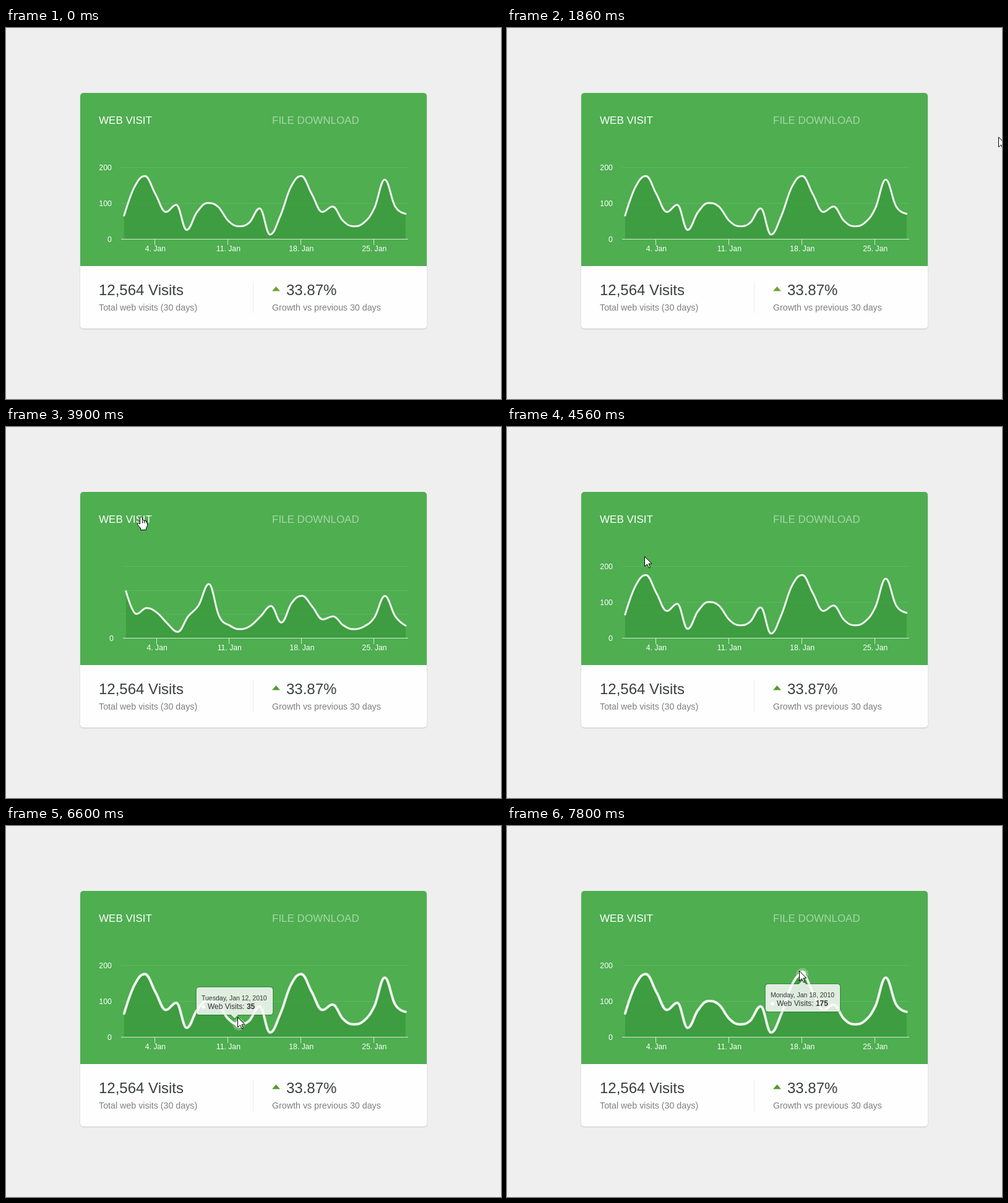
An HTML page with a canvas for the animation above (8000 ms loop, 800 by 600 pixels).

```html
<!DOCTYPE html>
<html lang="en">
<head>
<meta charset="utf-8">
<title>Web visit card</title>
<style>
  html, body { margin: 0; width: 100%; height: 100%; overflow: hidden; background: #efefef; }
  canvas { display: block; }
</style>
</head>
<body>
<canvas id="stage" width="800" height="600"></canvas>
<script>
const ctx = document.getElementById('stage').getContext('2d');
const FONT = '"Liberation Sans", Arial, sans-serif';
const LOOP = 8000, MORPH = 190, BASE = 341, TOP = 225, RIGHT = 650;
const TO_FILES = 3000, TO_VISITS = 3900, RELOAD = 720, HOVER = 4620;

const visits = [65, 145, 175, 125, 75, 95, 25, 75, 100, 90, 50, 35, 45, 85,
  12, 65, 145, 175, 125, 75, 90, 50, 35, 45, 85, 165, 90, 70];
const files = [19.5, 10, 12.5, 10.5, 6, 2.5, 9, 13.5, 22.5, 9, 5.2, 3.6, 5, 9,
  13.3, 6.4, 14.6, 17.6, 13, 7.7, 9, 5.2, 3.6, 4.8, 8.6, 17.5, 9, 5.1];
const weekdays = ['Sunday', 'Monday', 'Tuesday', 'Wednesday', 'Thursday', 'Friday', 'Saturday'];

// Pointer track: time, x, y
const track = [
  [0, 830, 190], [1830, 805, 182], [1860, 794, 176], [2040, 718, 125], [2220, 645, 99],
  [2340, 593, 107], [2490, 541, 128], [2640, 531, 144], [2670, 532, 146], [3390, 532, 146],
  [3540, 370, 147], [3690, 218, 146], [4380, 218, 146], [4560, 222, 209], [4680, 226, 226],
  [4770, 226, 229], [5010, 226, 229], [5150, 241, 262], [5280, 258, 288], [5420, 276, 292],
  [5670, 298, 314], [5790, 322, 300], [6180, 322, 300], [6420, 345, 290], [6560, 363, 303],
  [6600, 374, 309], [6780, 395, 300], [6960, 411, 288], [7080, 411, 288], [7260, 428, 325],
  [7440, 445, 298], [7620, 462, 252], [7710, 470, 238], [7800, 472, 234], [8000, 472, 234]
];

const clamp01 = v => Math.max(0, Math.min(1, v));
const swing = v => 0.5 - Math.cos(Math.PI * clamp01(v)) / 2;
const white = a => `rgba(255,255,255,${a})`;

function slope(i, axis) {
  const d = k => (track[k + 1][axis] - track[k][axis]) / (track[k + 1][0] - track[k][0]);
  if (i === 0 || i === track.length - 1) return 0;
  const a = d(i - 1), b = d(i);
  return a * b > 0 ? 2 * a * b / (a + b) : 0;
}

function pointerAt(t) {
  let i = 0;
  while (i < track.length - 2 && t >= track[i + 1][0]) i++;
  const span = track[i + 1][0] - track[i][0], u = (t - track[i][0]) / span;
  const at = axis => {
    const a = track[i][axis], b = track[i + 1][axis];
    const h = u * u * (3 - 2 * u);
    return a + (b - a) * h + span * u * (1 - u) * ((1 - u) * slope(i, axis) - u * slope(i + 1, axis));
  };
  return { x: at(1), y: at(2) };
}

function text(str, x, y, size, color, align = 'left', weight = '') {
  ctx.font = `${weight} ${size}px ${FONT}`;
  ctx.fillStyle = color;
  ctx.textAlign = align;
  ctx.fillText(str, x, y);
}

function line(x1, y1, x2, y2, color) {
  ctx.strokeStyle = color;
  ctx.lineWidth = 1;
  ctx.beginPath();
  ctx.moveTo(x1, y1);
  ctx.lineTo(x2, y2);
  ctx.stroke();
}

function polygon(points, dx = 0, dy = 0) {
  ctx.beginPath();
  points.forEach(([x, y]) => ctx.lineTo(x + dx, y + dy));
  ctx.closePath();
}

function disc(x, y, r, color) {
  ctx.fillStyle = color;
  ctx.beginPath();
  ctx.arc(x, y, r, 0, 7);
  ctx.fill();
}

function morphAt(t) {
  return t < TO_VISITS ? swing((t - TO_FILES) / MORPH) : 1 - swing((t - TO_VISITS) / MORPH);
}

const dayX = (day, m) => {
  const first = 190.9 + 3 * m;
  return first + (645.8 - first) * (day - 1) / 27;
};

function curvePoints(m) {
  return visits.map((v, i) => ({
    x: dayX(i + 1, m),
    y: BASE - (v * 0.58 * (1 - m) + files[i] * 116 / 30 * m)
  }));
}

// Spline whose control points never pass the neighbouring values
function traceCurve(pts) {
  ctx.moveTo(pts[0].x, pts[0].y);
  let out = pts[0];
  for (let i = 1; i < pts.length; i++) {
    const p = pts[i], prev = pts[i - 1], next = pts[i + 1];
    let inX = p.x, inY = p.y, nextOut = p;
    if (next) {
      inX = (1.5 * p.x + prev.x) / 2.5;
      const outX = (1.5 * p.x + next.x) / 2.5;
      const tilt = (next.y - prev.y) / (next.x - prev.x);
      const limit = (y, other) =>
        Math.max(Math.min(p.y, other), Math.min(Math.max(p.y, other), y));
      inY = limit(p.y + tilt * (inX - p.x), prev.y);
      const outY = limit(2 * p.y - inY, next.y);
      inY = 2 * p.y - outY;
      nextOut = { x: outX, y: outY };
    }
    ctx.bezierCurveTo(out.x, out.y, inX, inY, p.x, p.y);
    out = nextOut;
  }
}

function drawAxes(m, onFiles) {
  const left = 186 + 3 * m, labelX = 171 + 3 * m;
  const grid = (y, a) => line(left, Math.round(y) + 0.5, RIGHT, Math.round(y) + 0.5, white(0.1 * a));
  const label = (str, y, a = 1) => text(str, labelX, y + 5, 12.4, white(a), 'right');
  label(onFiles ? '0M' : '0', BASE);
  for (const k of [1, 2]) {
    const y = BASE - 58 * k * (1 - m);
    if (m < 1) {
      label(k * 100, y, 1 - m);
      grid(y, 1 - m);
    }
  }
  for (const k of [1, 2, 3]) {
    const y = BASE - 116 / 3 * k;
    grid(TOP + (y - TOP) * m, m);
    if (m === 1) label(k * 10 + 'M', y);
  }
}

function drawChart(t, m, onFiles, hovered) {
  if (t >= RELOAD && t < RELOAD + 30) return;
  drawAxes(m, onFiles);
  const pts = curvePoints(m);
  const shown = t < RELOAD ? 1 : swing((t - RELOAD - 30) / 610);
  ctx.save();
  if (shown < 1) {
    ctx.beginPath();
    ctx.rect(186, 200, 466 * shown, 150);
    ctx.clip();
  }
  ctx.beginPath();
  traceCurve(pts);
  ctx.lineTo(pts[27].x, BASE);
  ctx.lineTo(pts[0].x, BASE);
  ctx.fillStyle = 'rgba(57,151,59,.75)';
  ctx.fill();
  ctx.beginPath();
  traceCurve(pts);
  ctx.strokeStyle = white(0.92);
  ctx.lineWidth = hovered ? 4 : 3;
  ctx.lineJoin = ctx.lineCap = 'round';
  ctx.stroke();
  ctx.restore();

  line(186 + 3 * m, 341.5, RIGHT, 341.5, white(0.75));
  for (const day of [4, 11, 18, 25]) {
    const x = dayX(day, m);
    line(Math.floor(x - 0.6) + 0.5, 342, Math.floor(x - 0.6) + 0.5, 351, white(0.75));
    text(day + '. Jan', x, 361, 12.2, '#fff', 'center');
  }
  if (hovered) {
    const p = pts[hovered - 1];
    disc(p.x, p.y, 10, white(0.25));
    disc(p.x, p.y, 6, white(0.95));
  }
}

// Tooltip glides toward the nearest day, faster vertically than horizontally
function tooltipAt(t) {
  const pts = curvePoints(0), step = 5;
  let tip = null;
  for (let s = HOVER; s <= t; s += step) {
    const day = Math.max(1, Math.min(28, Math.round((pointerAt(s).x - 190.9) / 16.85) + 1));
    const p = pts[day - 1];
    const below = p.y - 58 < 222;
    const y = below ? p.y + 16 : p.y - 58;
    if (!tip) tip = { x: p.x, y };
    tip.x = p.x + (tip.x - p.x) * Math.exp(-step / 29.6);
    tip.y = y + (tip.y - y) * Math.exp(-step / 17);
    tip.day = day;
    tip.below = below;
  }
  return tip;
}

function drawTooltip({ x, y, day, below }) {
  const head = `${weekdays[(day + 4) % 7]}, Jan ${day}, 2010`;
  ctx.font = `10.5px ${FONT}`;
  const w = Math.round(ctx.measureText(head).width) + 17, h = 44;
  const l = Math.round(x + 1 - w / 2) + 0.5, top = Math.round(y) + 0.5;
  const r = l + w - 1, b = top + h - 1, c = x + 0.5;
  ctx.beginPath();
  ctx.moveTo(l + 3, top);
  if (below) [[c - 6, top], [c, top - 6], [c + 6, top]].forEach(p => ctx.lineTo(...p));
  ctx.arcTo(r, top, r, b, 3);
  ctx.arcTo(r, b, l, b, 3);
  if (!below) [[c + 6, b], [c, b + 6], [c - 6, b]].forEach(p => ctx.lineTo(...p));
  ctx.arcTo(l, b, l, top, 3);
  ctx.arcTo(l, top, r, top, 3);
  ctx.closePath();
  ctx.save();
  ctx.translate(1, 1);
  [[5, 0.05], [3, 0.1], [1, 0.15]].forEach(([width, a]) => {
    ctx.lineWidth = width;
    ctx.strokeStyle = `rgba(0,0,0,${a})`;
    ctx.stroke();
  });
  ctx.restore();
  ctx.fillStyle = 'rgba(249,249,249,.85)';
  ctx.fill();
  ctx.lineWidth = 1;
  ctx.strokeStyle = white(0.9);
  ctx.stroke();

  const tx = l + 7.5;
  text(head, tx, top + 20, 10.5, '#333');
  disc(tx + 3, top + 31, 3, white(0.9));
  text('Web Visits: ', tx + 10, top + 34.5, 12, '#333');
  const offset = ctx.measureText('Web Visits: ').width;
  text(visits[day - 1], tx + 10 + offset, top + 34.5, 12, '#333', 'left', 'bold');
}

const arrow = [[0, 0], [0, 16], [4, 12.5], [7, 18.5], [9, 17.5], [6.5, 11.5], [11.5, 11.5]];
const hand = [[-1, -1], [1, -1], [2, 0], [2, 4], [4.5, 4.5], [7.5, 5.5], [10, 7], [10, 13], [8, 17],
  [8, 20], [-1, 20], [-1, 17.5], [-5.5, 12], [-6, 9.5], [-4, 8.5], [-2, 10.5], [-2, 0]];

function drawPointer({ x, y }) {
  if (x > 802) return;
  const dx = Math.round(x) + 0.5, dy = Math.round(y) + 0.5;
  const onTab = y > 145 && y < 160 && (x < 236 || (x > 430 && x < 571));
  polygon(onTab ? hand : arrow, dx, dy);
  ctx.fillStyle = '#fff';
  ctx.fill();
  ctx.strokeStyle = '#000';
  ctx.lineWidth = 1;
  ctx.lineJoin = 'miter';
  ctx.stroke();
  if (onTab) [2, 5, 8].forEach(k => line(dx + k, dy + 5, dx + k, dy + 9, '#000'));
}

function drawCard(t, onFiles) {
  ctx.fillStyle = '#efefef';
  ctx.fillRect(0, 0, 800, 600);
  ctx.save();
  ctx.shadowColor = 'rgba(0,0,0,.18)';
  ctx.shadowBlur = 2;
  ctx.shadowOffsetY = 1;
  ctx.fillStyle = '#fefefe';
  ctx.beginPath();
  ctx.roundRect(120, 105, 560, 381, 5);
  ctx.fill();
  ctx.restore();
  ctx.fillStyle = '#4eae50';
  ctx.beginPath();
  ctx.roundRect(120, 105, 560, 280, [5, 5, 0, 0]);
  ctx.fill();

  text('WEB VISIT', 150, 155, 17, white(onFiles ? 0.5 : 1));
  text('FILE DOWNLOAD', 430, 155, 17, white(onFiles ? 1 : 0.5));

  line(399.5, 410, 399.5, 461, '#ececec');
  const bigY = onFiles ? 447 : 432, smallY = onFiles ? 422 : 457;
  text(onFiles ? '9,438 Downloads' : '12,564 Visits', 150, bigY, 24, '#3c3f3f');
  text('33.87%', 453, bigY, 24, '#3c3f3f');
  text('Total web visits (30 days)', 150, smallY, 14.25, '#7d807d');
  text('Growth vs previous 30 days', 430, smallY, 14.25, '#7d807d');
  if (onFiles) {
    polygon([[430, 436], [443, 436], [436.5, 443]]);
    ctx.fillStyle = '#a84a2c';
  } else {
    polygon([[430, 425.5], [443, 425.5], [436.5, 418]]);
    ctx.fillStyle = t < TO_FILES ? '#6ba433' : '#529b2c';
  }
  ctx.fill();
}

function render(t) {
  const onFiles = t >= TO_FILES && t < TO_VISITS;
  const tip = tooltipAt(t);
  drawCard(t, onFiles);
  drawChart(t, morphAt(t), onFiles, tip && tip.day);
  if (tip) drawTooltip(tip);
  drawPointer(pointerAt(t));
}

function tick() {
  render(performance.now() % LOOP);
  requestAnimationFrame(tick);
}
tick();
</script>
</body>
</html>
```
